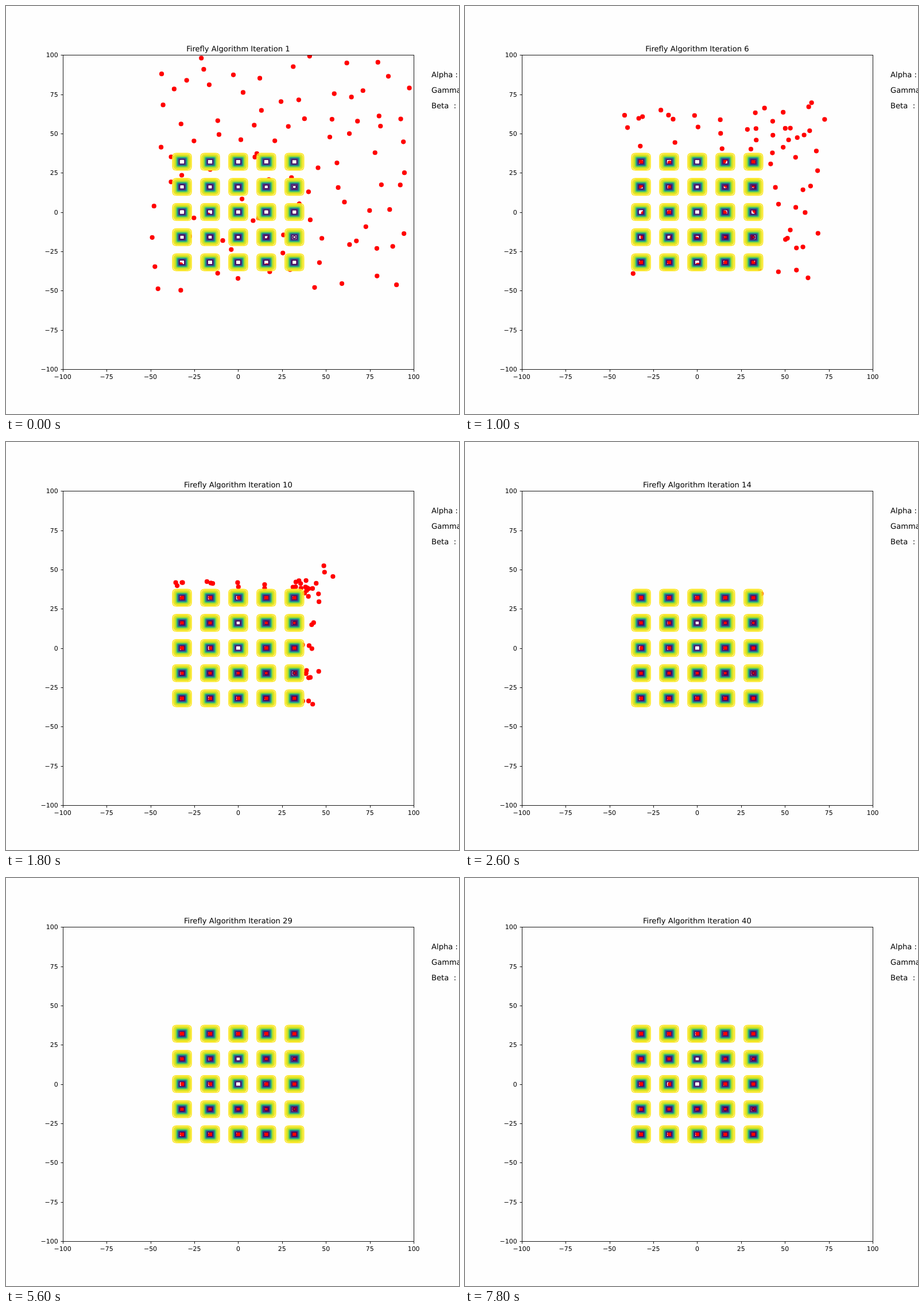
These frames come from a looping animation (789x710 px, 8 s). An HTML page:

```html
<!DOCTYPE html>
<html lang="en">
<head>
<meta charset="utf-8">
<style>
  html, body { margin: 0; width: 100%; height: 100%; overflow: hidden; background: #fefefe; }
  svg { display: block; width: 789px; height: 710px; }
  text { font: 10.96px "DejaVu Sans", sans-serif; white-space: pre; text-rendering: geometricPrecision; }
  .big { font-size: 13.15px; }
</style>
</head>
<body>
<svg viewBox="0 0 789 710">
  <clipPath id="plot"><rect x="99" y="85" width="612" height="548"/></clipPath>
  <g id="dots" clip-path="url(#plot)" fill="#f00"></g>
  <g id="wells" fill="none" stroke-width="1.64"></g>
  <g id="axes" stroke="#000" stroke-width=".9" fill="none">
    <rect x="99.5" y="85.5" width="611" height="547"/>
  </g>
  <g id="labels">
    <text id="title" class="big" x="404.4" y="79" text-anchor="middle"></text>
    <text class="big" x="741" y="124">Alpha : 0</text>
    <text class="big" x="741" y="151">Gamma : 0</text>
    <text class="big" x="741" y="178">Beta  : 0</text>
  </g>
</svg>
<script>
const STEP = 200, ITERATIONS = 40;
const byId = id => document.getElementById(id);
const px = x => 404.4 + 3.0574 * x;
const py = y => 358.55 - 2.7335 * y;

function add(parent, tag, attrs, text) {
  const el = document.createElementNS(parent.namespaceURI, tag);
  for (const key in attrs) el.setAttribute(key, attrs[key]);
  if (text) el.textContent = text;
  return parent.appendChild(el);
}

// Axis ticks
for (let v = -100; v <= 100; v += 25) {
  const x = Math.round(px(v)) + .5, y = Math.round(py(v)) + .5;
  const label = String(v).replace('-', '\u2212');
  add(byId('axes'), 'path', { d: `M${x} 632.5v4M99.5 ${y}h-4` });
  add(byId('labels'), 'text', { x: px(v), y: 649, 'text-anchor': 'middle' }, label);
  add(byId('labels'), 'text', { x: 90.7, y: py(v) + 4, 'text-anchor': 'end' }, label);
}

// Contours of the foxholes function: near hole j, f = 1 / (.002 + 1 / (j + dx^6 + dy^6))
const viridis = ['440154', '482878', '3e4989', '31688e', '26828e', '1f9e89', '35b779', '6ece58', 'b5de2b', 'fde725']
  .map(hex => [0, 2, 4].map(i => parseInt(hex.slice(i, i + 2), 16)));

function color(t) {
  const i = Math.min(8, Math.floor(t * 9)), f = t * 9 - i;
  return `rgb(${viridis[i].map((c, k) => Math.round(c + (viridis[i + 1][k] - c) * f))})`;
}

function ring(cx, cy, r) {
  const bend = c => Math.cbrt(c) * r;
  const points = [];
  for (let i = 0; i < 48; i++) {
    const a = (i + .5) * Math.PI / 24;
    points.push(px(cx + bend(Math.cos(a))).toFixed(2) + ' ' + py(cy + bend(Math.sin(a))).toFixed(2));
  }
  return 'M' + points.join('L') + 'Z';
}

const holes = [];
for (let j = 1; j <= 25; j++) {
  const cx = (j - 1) % 5 * 16 - 32, cy = Math.floor((j - 1) / 5) * 16 - 32;
  holes.push({ x: cx, y: cy });
  for (let level = 10; level <= 490; level += 10) {
    const s = 1 / (1 / level - .002) - j;
    if (s > 0) add(byId('wells'), 'path', { d: ring(cx, cy, s ** (1 / 6)), stroke: color((level - 10) / 480) });
  }
}

// Fireflies: one at random in each cell of a 10 x 10 grid over [-50, 100]
let seed = 12;
function random() {
  seed = seed + 0x6D2B79F5 | 0;
  let t = Math.imul(seed ^ seed >>> 15, 1 | seed);
  t = t + Math.imul(t ^ t >>> 7, 61 | t) ^ t;
  return ((t ^ t >>> 14) >>> 0) / 2 ** 32;
}

// Two holes in the middle column stay empty
const goals = holes.filter(h => h.x || h.y < 0 || h.y > 16);

const flies = Array.from({ length: 100 }, (_, i) => {
  const x = (i % 10 + random()) * 15 - 50, y = (Math.floor(i / 10) + random()) * 15 - 50;
  const distance = h => Math.hypot(px(h.x) - px(x), py(h.y) - py(y));
  const goal = goals.reduce((a, b) => distance(b) < distance(a) ? b : a);
  const d = distance(goal);
  return {
    x: px(x), y: py(y), goalX: px(goal.x) + 1, goalY: py(goal.y),
    steps: Math.max(6, Math.min(11, d / 8), d / 17),
    driftX: (random() - .5) * d / 8, driftY: (random() - .5) * d / 8,
    el: add(byId('dots'), 'circle', { r: 4.1 })
  };
});

function place(fly, index, step) {
  const f = Math.min(1, step / fly.steps), bow = Math.sin(Math.PI * f);
  const wobble = f === 1 ? .6 : 0;
  const move = (from, to, drift) => from + (to - from) * f + drift * bow;
  fly.el.setAttribute('cx', move(fly.x, fly.goalX, fly.driftX) + wobble * Math.sin(index * 7.3 + step * 2.1));
  fly.el.setAttribute('cy', move(fly.y, fly.goalY, fly.driftY) + wobble * Math.cos(index * 5.1 + step * 3.7));
}

let shown = -1;
function draw(now) {
  const step = Math.floor(now / STEP) % ITERATIONS;
  if (step !== shown) {
    shown = step;
    byId('title').textContent = `Firefly Algorithm Iteration ${step + 1}`;
    flies.forEach((fly, i) => place(fly, i, step));
  }
  requestAnimationFrame(draw);
}
draw(0);
</script>
</body>
</html>
```
